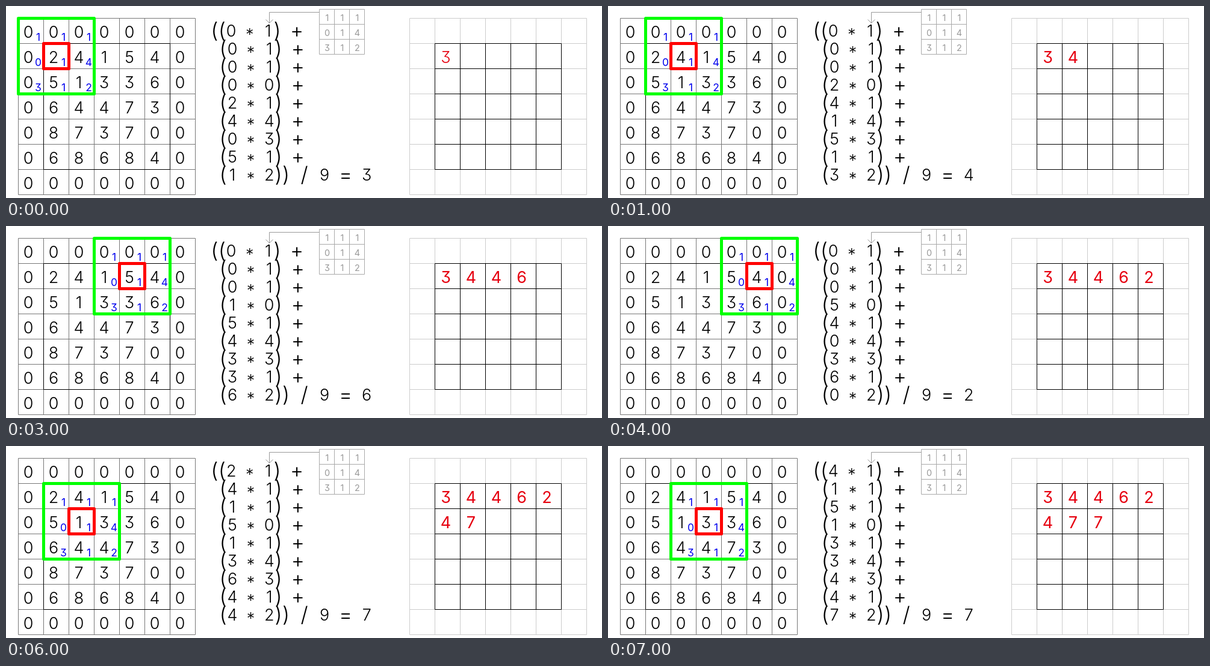
Animation of 990 by 320 pixels, one loop 8 s. Source, as an HTML page:

```html
<!DOCTYPE html>
<html lang="en">
<head>
<meta charset="utf-8">
<title>3×3 convolution</title>
<style>
  html, body { margin: 0; width: 100%; height: 100%; overflow: hidden; background: #fff; }
  svg { display: block; }
  text {
    font-family: Inter, Roboto, sans-serif;
    font-weight: 300;
    font-feature-settings: "cv09", "calt" 0;
    text-anchor: middle;
  }
  path, rect { fill: none; stroke-linejoin: round; }
</style>
</head>
<body>
<svg width="990" height="320" viewBox="0 0 990 320">
  <g id="fixed"></g>
  <g id="moving"></g>
</svg>
<script>
const STEP_MS = 1000, CELL = 42, TOP = 20, LEFT = 20, RIGHT = 670, DIGIT = 27;
const input = ['0000000', '0241540', '0513360', '0644730', '0873700', '0686840', '0000000'];
const kernel = '111014312';
const results = '34462477';

// Expression characters: advance in font units, font size and baseline shift in px
const UNIT = 0.9;
const digit = { advance: 20, size: DIGIT, shift: 0 };
const bracket = { advance: 14, size: 35, shift: 2 };
const operator = { advance: 26, size: 34, shift: 1.5 };
const glyphs = {
  ' ': { advance: 16, size: DIGIT, shift: 0 },
  '*': { advance: 16, size: DIGIT, shift: 5.5 },
  '/': { advance: 22, size: 35, shift: 2 },
  '(': bracket, ')': bracket, '+': operator, '=': operator,
};

const times = (n, fn) => Array.from({ length: n }, (_, i) => fn(i)).join('');

// Text centred on (x, y)
const label = (s, x, y, size, color, weight = 300) =>
  `<text x="${x}" y="${y + size * 0.364}" font-size="${size}" fill="${color}" style="font-weight:${weight}">${s}</text>`;

const path = (d, color) => `<path d="${d}" transform="translate(.5 .5)" stroke="${color}"/>`;

const grid = (x, y, n, cell, color) => path(
  times(n + 1, i => `M${x + i * cell} ${y}v${n * cell}M${x} ${y + i * cell}h${n * cell}`), color);

const frame = (col, row, n, color) =>
  `<rect x="${LEFT + col * CELL + 0.5}" y="${TOP + row * CELL + 0.5}" width="${n * CELL}" height="${n * CELL}" stroke="${color}" stroke-width="5"/>`;

function expressionLine(s, baseline) {
  let x = 340;
  const spans = [...s].map(ch => {
    const { advance, size, shift } = glyphs[ch] || digit;
    const width = advance * UNIT;
    const span = `<tspan x="${x + width / 2}" y="${baseline + shift}" font-size="${size}">${ch}</tspan>`;
    x += width;
    return span;
  });
  return `<text>${spans.join('')}</text>`;
}

function fixedParts() {
  return grid(LEFT, TOP, 7, CELL, '#777')
    + path(`M${LEFT + CELL} ${TOP + CELL}h210v210h-210z`, '#000')
    + times(49, i => label(input[i / 7 | 0][i % 7],
        LEFT + i % 7 * CELL + 17, TOP + (i / 7 | 0) * CELL + 23, DIGIT, '#000'))
    + grid(RIGHT, TOP, 7, CELL, '#ccc')
    + grid(RIGHT + CELL, TOP + CELL, 5, CELL, '#000')
    + grid(520, 5, 3, 25, '#aaa')
    + times(9, i => label(kernel[i], 533.5 + i % 3 * 25, 19.5 + (i / 3 | 0) * 25, 14.5, '#999', 400))
    + path('M520 10H437V28M431 22l6 6l6 -6', '#999');
}

function movingParts(step) {
  const col = step % 5, row = step / 5 | 0;
  const weights = times(9, i => label(kernel[i],
    LEFT + (col + i % 3) * CELL + 33.5, TOP + (row + (i / 3 | 0)) * CELL + 32, 17.5, '#00e', 400));
  const expression = times(9, i => {
    const value = input[row + (i / 3 | 0)][col + i % 3];
    const tail = i < 8 ? ') +' : `)) / 9 = ${results[step]}`;
    return expressionLine(`${i ? ' ' : '('}(${value} * ${kernel[i]}${tail}`, 51 + i * 30);
  });
  const output = times(step + 1, i => label(results[i],
    RIGHT + (i % 5 + 1) * CELL + 18.5, TOP + ((i / 5 | 0) + 1) * CELL + 23, DIGIT, '#e60010', step ? 400 : 300));
  return weights + frame(col, row, 3, '#0f0') + frame(col + 1, row + 1, 1, '#f00') + expression + output;
}

const moving = document.getElementById('moving');
document.getElementById('fixed').innerHTML = fixedParts();

const start = performance.now();
let shown = -1;
function draw() {
  const step = Math.floor((performance.now() - start) / STEP_MS) % results.length;
  if (step !== shown) moving.innerHTML = movingParts(shown = step);
  requestAnimationFrame(draw);
}
draw();
</script>
</body>
</html>
```
